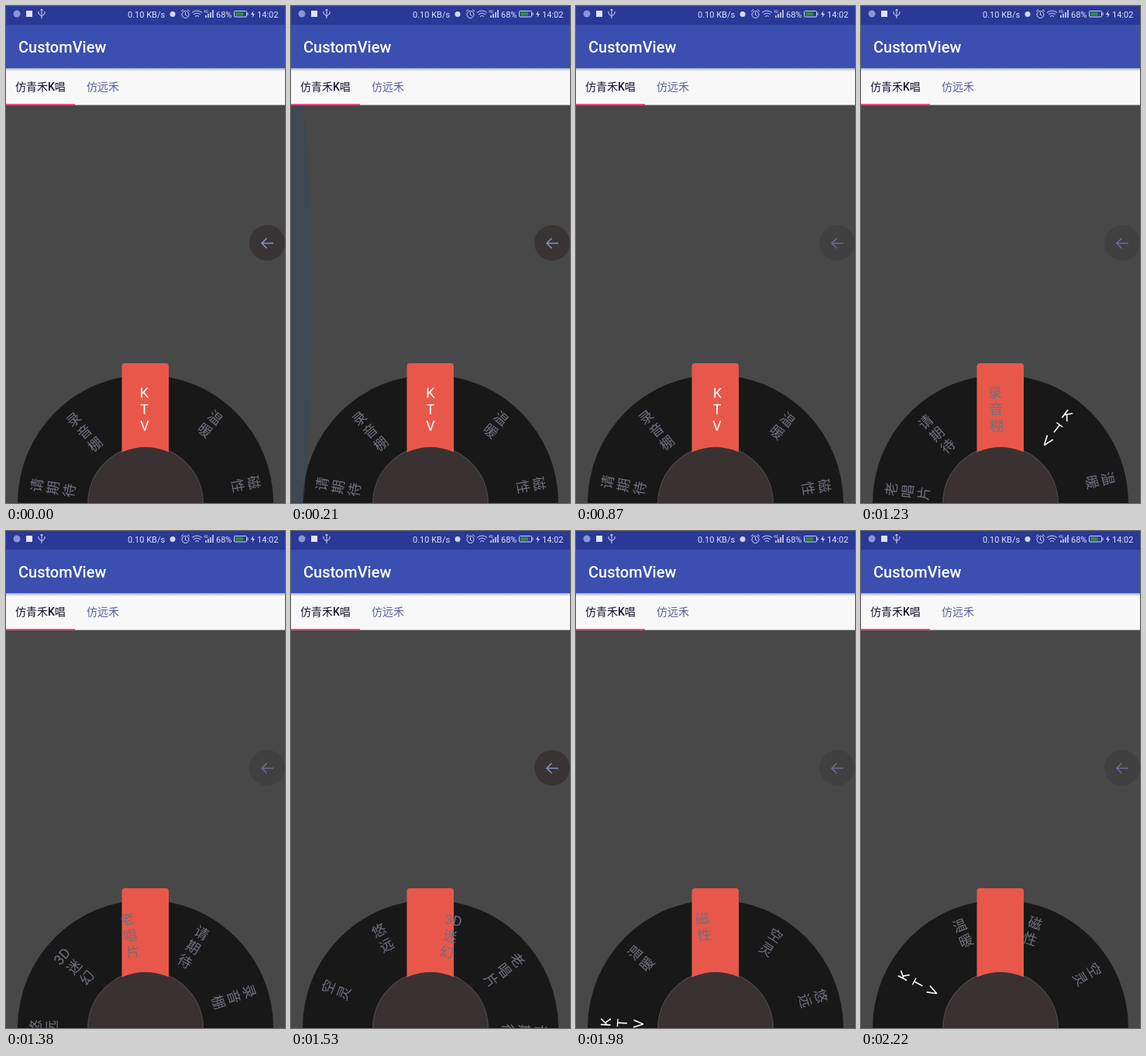
An HTML page for the animation above (2250 ms loop, 360 px wide and 640 px high).

```html
<!DOCTYPE html>
<html lang="zh-CN">
<head>
<meta charset="utf-8">
<title>CustomView</title>
<style>
html, body { margin: 0; width: 100%; height: 100%; overflow: hidden; background: #484848; }
svg { display: block; width: 360px; height: 640px; }
text { font-family: Roboto, "Noto Sans CJK SC", "Noto Sans CJK", sans-serif; }
.status { font-size: 11px; fill: #dfe3f6; }
.tab { font-size: 14px; }
.icon { fill: none; stroke: #d4d9f2; stroke-width: 1; }
#wheel text { font-size: 18px; text-anchor: middle; fill: #70707f; }
#wheel .on text { fill: #fff; }
</style>
</head>
<body>
<svg viewBox="0 0 360 640">
  <defs>
    <linearGradient id="shade" x2="0" y2="1">
      <stop stop-color="#a9abbc"/><stop offset="1" stop-color="#f8f8f8"/>
    </linearGradient>
  </defs>
  <rect width="360" height="640" fill="#484848"/>

  <!-- wheel -->
  <circle cx="180" cy="640" r="165" fill="#181818"/>
  <circle cx="180" cy="641" r="74" fill="none" stroke="#464242" stroke-width="2"/>
  <path d="M149.500 640V464q0-4 4-4h52.500q4 0 4 4V640z" fill="#e8584a"/>
  <g id="wheel"></g>
  <circle cx="180" cy="641" r="73" fill="#3a3232"/>

  <!-- floating button -->
  <circle id="button" cx="337" cy="305" r="23"/>
  <path id="arrow" d="M345 305.500H330M336.500 299l-6.500 6.500 6.500 6.500" fill="none" stroke-width="1.700"/>

  <path id="glow" fill="#364858"/>

  <!-- status bar -->
  <rect width="360" height="24" fill="#2a3898"/>
  <circle cx="14" cy="10" r="4.500" fill="#8a96d0"/>
  <rect x="26" y="6" width="8" height="8" fill="#dfe3f6"/>
  <path class="icon" d="M46 4v12M42 7v3l4 3 4-3V7M44.500 6L46 4l1.500 2"/>
  <text class="status" x="157" y="14.500">0.10 KB/s</text>
  <circle cx="215" cy="10.500" r="3.500" fill="#d4d9f2"/>
  <g class="icon">
    <circle cx="231.500" cy="11" r="4.500"/>
    <path d="M231.500 8v3.500l2 1M226 7l3-2.500M237 7l-3-2.500"/>
    <path d="M240 8.500q6.500-5 13 0M242 11q4.500-3.500 9 0M244 13.500q2.500-2 5 0"/>
    <path d="M258 15v-3M261 15v-5M264 15V8M267 15V5" stroke-width="1.600"/>
    <rect x="294.500" y="6.500" width="16" height="7.500" rx="1"/>
    <path d="M312 8.500v3.500"/>
  </g>
  <text class="status" x="255" y="8.500" style="font-size:5px">4G</text>
  <text class="status" x="271" y="14.500">68%</text>
  <rect x="296" y="8" width="10" height="4.500" fill="#2f8a45"/>
  <path d="M319.500 6l-3.500 5h2.500l-1 4 3.500-5h-2.500z" fill="#dfe3f6"/>
  <text class="status" x="324" y="14.500">14:02</text>

  <!-- title and tabs -->
  <rect y="24" width="360" height="56" fill="#3a4fb0"/>
  <text x="16" y="60" font-size="20" font-weight="500" fill="#fff">CustomView</text>
  <rect y="80" width="360" height="47.500" fill="#f8f8f8"/>
  <rect y="80" width="360" height="4" fill="url(#shade)"/>
  <text class="tab" x="12" y="109" font-weight="500" fill="#15152e">仿青禾K唱</text>
  <text class="tab" x="104" y="109" fill="#5a60a2">仿远禾</text>
  <rect y="126" width="89" height="2" fill="#f04880"/>
</svg>
<script>
const LOOP = 2250, STEP = 30;
const items = ["K T V", "录 音 棚", "请 期 待", "老 唱 片", "3D 迷 幻", "悠 远", "空 灵", "磁 性", "温 暖"];
const el = id => document.getElementById(id);
const set = (node, attrs) => { for (const k in attrs) node.setAttribute(k, attrs[k]); };

el("wheel").innerHTML = items.map((item, i) =>
  `<g class="${i ? "" : "on"}">` + item.split(" ").map((row, j) =>
    `<text x="180" y="${504.5 + 21.2 * j}">${row}</text>`).join("") + "</g>").join("");
const spokes = [...el("wheel").children];

// Rest, quick drag, then a fling that slows down
function angle(t) {
  if (t < 1156) return Math.min(1, -0.7 + t / 340);
  if (t < 1350) return 1 + (t - 1156) * 0.489;
  return 336.6 - 240.8 * Math.exp((1350 - t) / 473);
}

function glowDepth(t) {
  if (t >= 960) return 0;
  return t < 300 ? t / 7.5 : 40 * ((960 - t) / 660) ** 1.35;
}

function draw(now) {
  const t = Math.floor(now % LOOP / STEP) * STEP;
  const turn = angle(t);
  spokes.forEach((s, i) => set(s, { transform: `rotate(${turn - 40 * i} 180 640)` }));

  const d = glowDepth(t);
  set(el("glow"), {
    d: `M0 128H${d * 0.58}Q${d * 1.42} 384 ${d * 0.58} 640H0z`,
    opacity: Math.min(0.5, d / 48)
  });

  const bright = t < 570 || (t >= 1400 && t < 1700);
  set(el("button"), { fill: bright ? "#393535" : "#404040" });
  set(el("arrow"), { stroke: bright ? "#8690bc" : "#6a6c94" });
  requestAnimationFrame(draw);
}
requestAnimationFrame(draw);
</script>
</body>
</html>
```
